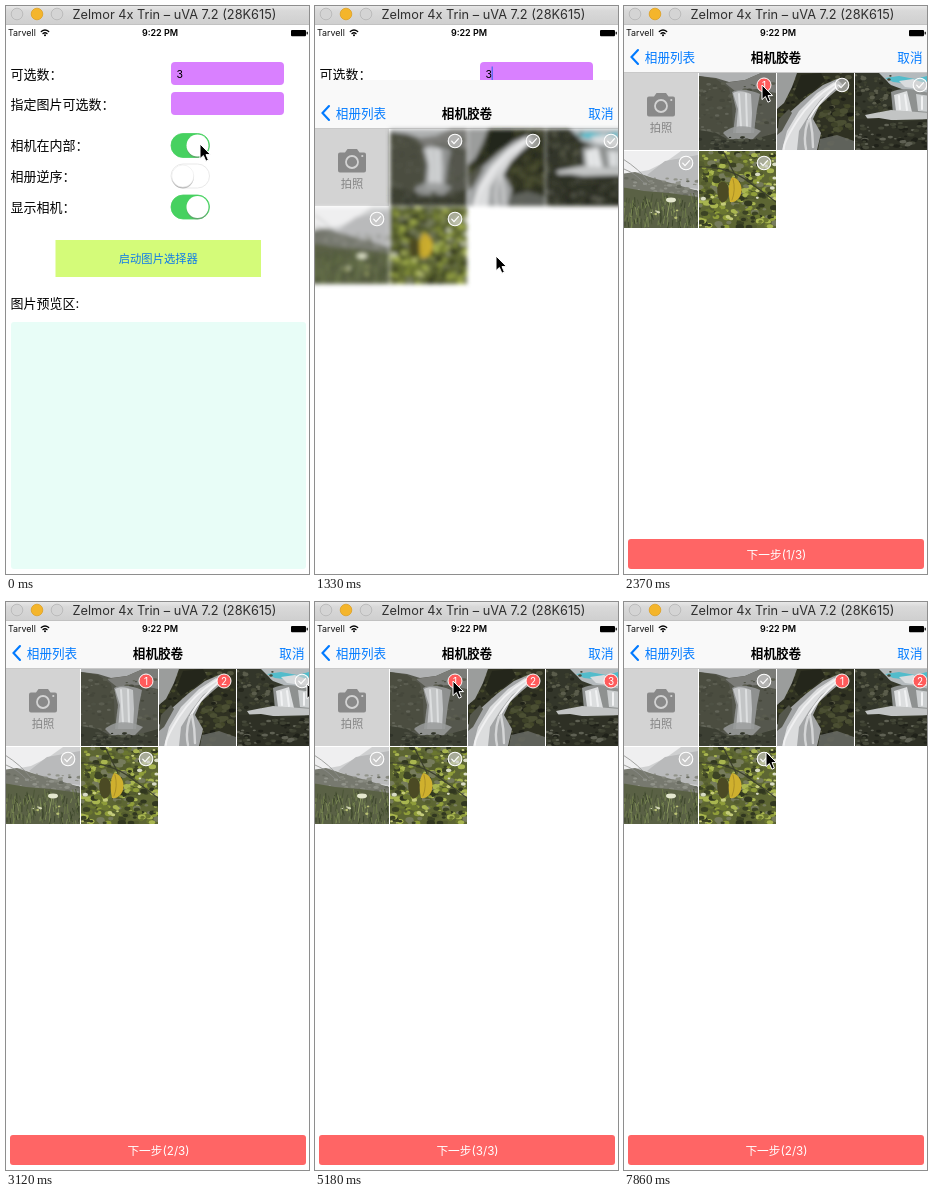
Recreate the animation shown at these times as an HTML page. Size 303 by 568 pixels, loop 8000 ms.

```html
<!DOCTYPE html>
<html lang="zh-CN">
<head>
<meta charset="utf-8">
<style>
html, body { margin: 0; width: 100%; height: 100%; overflow: hidden; background: #fff; }
svg { display: block; }
text { font-family: Inter, 'Noto Sans CJK SC', 'Noto Sans CJK', sans-serif; white-space: pre; }
</style>
</head>
<body>
<svg id="stage" width="303" height="568" viewBox="0 0 303 568"></svg>
<script>
const LOOP = 8000, TICK = 148.2, BLUE = '#007aff';
const stage = document.getElementById('stage');
const get = id => document.getElementById(id);

// Text placed by its vertical centre.
const text = (x, cy, size, str, fill = '#000', extra = '') =>
  `<text x="${x}" y="${cy + size * 0.37}" font-size="${size}" fill="${fill}" ${extra}>${str}</text>`;
const mid = 'text-anchor="middle"';
const rect = (x, y, w, h, fill, extra = '') =>
  `<rect x="${x}" y="${y}" width="${w}" height="${h}" fill="${fill}" ${extra}/>`;
const path = (d, fill, extra = '') => `<path d="${d}" fill="${fill}" ${extra}/>`;
const line = (d, stroke, width, extra = '') =>
  path(d, 'none', `stroke="${stroke}" stroke-width="${width}" stroke-linecap="round" ${extra}`);
const circle = (x, y, r, fill, extra = '') =>
  `<circle cx="${x}" cy="${y}" r="${r}" fill="${fill}" ${extra}/>`;

function random(seed) {
  return () => (seed = (seed * 16807) % 2147483647) / 2147483647;
}

// Scattered dabs of colour inside a box.
function dabs(seed, n, colors, x, y, w, h, rx, ry) {
  const rnd = random(seed * 7919);
  let out = '';
  for (let i = 0; i < n; i++) {
    const k = 0.5 + rnd();
    out += `<ellipse cx="${(x + rnd() * w).toFixed(1)}" cy="${(y + rnd() * h).toFixed(1)}" rx="${(rx * k).toFixed(1)}" ry="${(ry * k).toFixed(1)}" fill="${colors[Math.floor(rnd() * colors.length)]}"/>`;
  }
  return out;
}

function grass(seed, n) {
  const rnd = random(seed * 7919), colors = ['#6c7a4a', '#4a5436', '#7d8c56', '#3c452b'];
  let out = '';
  for (let i = 0; i < n; i++) {
    const x = rnd() * 78, y = 50 + rnd() * 30, tall = 3 + rnd() * 7;
    out += line(`M${x.toFixed(1)} ${y.toFixed(1)}l${(rnd() * 4 - 2).toFixed(1)} ${(-tall).toFixed(1)}`, colors[i % 4], 0.9);
  }
  return out;
}

const photos = [
  // wide fall between hills
  () => rect(0, 0, 77, 77, '#55574d') +
    path('M0 0H62L46 7L30 9L17 5L0 3Z', '#b0b2b3') +
    path('M46 7L62 0H77V20L58 16L36 18L26 10Z', '#7b7c78') +
    path('M0 3L17 6L30 15L33 30L34 60L0 66Z', '#4b4d40') +
    dabs(11, 110, ['#5a5c4f', '#45473b', '#626458', '#4e5144'], 0, 10, 77, 52, 2, 1.1) +
    path('M33 19C40 15 52 17 61 21L58 36L55 60L34 60L37 36Z', '#8f9190') +
    path('M34 20C39 17 46 18 52 21L53 40L52 60L37 60L39 36Z', '#c3c5c6') +
    line('M40 21L42 54M47 21L48 54', '#dddfe0', 2) +
    path('M24 60C34 51 50 52 62 58L54 66H30Z', '#9a9d9d', 'opacity=".85"') +
    path('M0 57L17 60L30 67L52 67L77 60V77H0Z', '#3c3f33') +
    dabs(12, 50, ['#4a4d40', '#2f3229', '#565a4b'], 0, 64, 77, 13, 2, 1),
  // stream running over rocks
  () => rect(0, 0, 77, 77, '#2f3122') +
    dabs(23, 120, ['#1f2118', '#44482a', '#3a3d28', '#54563f'], 0, 0, 77, 77, 2.4, 1.6) +
    path('M0 0H20L15 14L7 30L0 36Z', '#9b9d9c') +
    path('M60 6L66 12L54 22L42 33L36 46L44 60L40 77H0V56L12 40L30 24L46 12Z', '#a3a5a6') +
    path('M57 9L62 12L44 26L32 42L22 58L20 77H5L10 58L22 38L40 20Z', '#dcddde') +
    line('M58 11Q34 26 20 48T7 76M60 13Q42 28 32 46', '#f0f0f1', 2) +
    line('M31 48Q26 62 29 76M33 46Q36 60 36 74', '#d5d6d7', 2.4) +
    path('M2 46L12 36L15 40L5 58L0 62Z', '#55574c') +
    path('M24 2L44 0L48 8L36 18L22 27L17 20Z', '#24261b') +
    dabs(24, 26, ['#3f4329', '#1a1b14', '#4b4f33'], 44, 26, 30, 34, 3, 2) +
    path('M43 66L60 62L77 68V77H41Z', '#6c6e69', 'opacity=".8"'),
  // distant fall under a blue sky
  () => rect(0, 0, 77, 77, '#35382b') +
    path('M22 0H77V22L52 18L36 12Z', '#b4babd') +
    path('M30 5L44 3L60 6L72 3V9L56 11L38 9Z', '#52bccb') +
    path('M44 8L58 6L72 11V17L50 14Z', '#d9dcde') +
    path('M0 0H24L32 8L38 18L41 39L0 46Z', '#33362a') +
    dabs(31, 70, ['#454836', '#25271d', '#3d402f', '#5b5d4c'], 0, 2, 36, 42, 2, 1.4) +
    path('M36 19C48 13 64 17 77 21V41L38 40Z', '#8e9190') +
    path('M39 22L52 18L57 39L41 38Z', '#dcdedf') +
    path('M61 21L77 23V39L63 38Z', '#cccfd0') +
    line('M44 23L45 36M50 22L52 37M67 24V36', '#f1f2f3', 2) +
    path('M10 42L36 37L77 40V46L40 47L14 48Z', '#c2c4c4') +
    path('M0 46L24 45L48 49L77 46V77H0Z', '#2e3025') +
    dabs(32, 90, ['#46493a', '#20221a', '#3d4031', '#5f6154'], 0, 50, 77, 27, 2.4, 1.2),
  // grass slope
  () => rect(0, 0, 77, 77, '#cfd0d1') +
    path('M0 0H60L46 10L28 19L0 24Z', '#efeff0') +
    path('M44 10L77 4V38L46 34L26 24Z', '#b9babb') +
    path('M0 23L14 21L32 27L50 32L77 40V77H0Z', '#77796f') +
    dabs(41, 70, ['#85877d', '#686b60', '#91938a'], 0, 27, 77, 20, 2, 1.1) +
    line('M2 8Q18 18 28 31M3 18Q16 23 25 34', '#8c8d8b', 0.8) +
    path('M0 36L23 40L48 42L77 46V77H0Z', '#5a6145') +
    grass(42, 150) +
    line('M49 50L46 66', '#8c9a60', 1) +
    `<ellipse cx="50" cy="49" rx="5" ry="2.4" fill="#e4e7cf"/>` +
    dabs(43, 8, ['#b9c074', '#d5d8b8'], 22, 53, 40, 14, 1.1, 0.8),
  // leaves
  () => rect(0, 0, 77, 77, '#5d6633') +
    dabs(51, 330, ['#8f9d3a', '#3c4324', '#a9b650', '#6a7630', '#31371f', '#767b5c', '#545c2f'], 0, 0, 77, 77, 2.8, 1.9) +
    dabs(52, 26, ['#d9dcc4', '#c5cc7a'], 0, 0, 77, 77, 1.8, 1.3) +
    line('M0 16Q28 15 50 31T77 51M24 0L37 26', '#3b3f2c', 1.2) +
    path('M20 32C26 28 31 34 30 42C29 49 25 53 22 51C18 46 17 38 20 32Z', '#4b4a24') +
    path('M33 26C40 27 44 35 42 43C40 49 35 52 31 51C29 42 29 32 33 26Z', '#cfb02e') +
    line('M34 28Q37 39 33 49', '#a98c25', 0.9)
];

const cells = [[1, 0], [2, 0], [3, 0], [0, 1], [1, 1]];
const cellX = c => -3 + 78 * c, cellY = r => 67 + 78 * r;

const photo = (draw, i) => {
  const [c, r] = cells[i];
  return `<svg x="${cellX(c)}" y="${cellY(r)}" width="77" height="77">${draw()}</svg>`;
};

const badge = ([c, r], i) => `<g transform="translate(${cellX(c) + 65} ${cellY(r) + 12})">
  <g id="off${i}">${circle(0, 0, 6.8, '#d0d0d0', 'fill-opacity=".65" stroke="#fff" stroke-width="1.1"')}
    ${line('M-3.3 .2L-1 2.6L3.5 -2.3', '#fff', 1.2)}</g>
  <g id="on${i}">${circle(0, 0, 7, '#ff5b5b', 'stroke="#fff" stroke-width="1"')}
    <text id="num${i}" y="3.7" font-size="10" fill="#fff" ${mid}></text></g></g>`;

function toggle(cy, on) {
  const x = on ? 191.5 : 176.8;
  return rect(165, cy - 12, 38.5, 24, on ? '#47d160' : '#fff',
      `rx="12" stroke="${on ? '#47d160' : '#e4e4e4'}" stroke-width=".8"`) +
    circle(x, cy + 1.6, 10.9, '#777', 'opacity=".45"') +
    circle(x, cy, 11, '#fff', on ? '' : 'stroke="#e6e6e6" stroke-width=".5"');
}

const labels = [['可选数：', 68], ['指定图片可选数：', 98], ['相机在内部：', 139],
  ['相册逆序：', 170], ['显示相机：', 201], ['图片预览区:', 297.5]];

const form = labels.map(([s, y]) => text(4.5, y, 13, s)).join('') +
  rect(165, 56, 113, 23, '#d980ff', 'rx="4"') +
  rect(165, 86, 113, 23, '#d980ff', 'rx="4"') +
  text(170.5, 67.8, 10.5, '3') +
  rect(176.6, 60.5, 1.2, 14, '#4868ee', 'id="caret"') +
  toggle(139.5, true) + toggle(170, false) + toggle(201, true) +
  rect(49.5, 234, 205.5, 37, '#d4fb79') +
  text(152.3, 252.5, 11.3, '启动图片选择器', '#0f7bea', `id="launch" ${mid}`) +
  rect(5, 316, 295, 247, '#e8fdf7', 'rx="3"');

const camera = rect(0, 67, 74, 77, '#d3d3d3') +
  path('M25 90.5H30L32.5 87H42L44.5 90.5H49Q51 90.5 51 92.5V108.5Q51 110.5 49 110.5H25Q23 110.5 23 108.5V92.5Q23 90.5 25 90.5Z', '#898989') +
  circle(37, 100, 6, 'none', 'stroke="#d3d3d3" stroke-width="1.8"') +
  circle(47.3, 94, 1.1, '#d3d3d3') +
  text(37, 122, 11.3, '拍照', '#858585', mid);

const picker = rect(0, 18, 303, 551, '#fff') +
  rect(0, 18, 303, 48.5, '#f9f9f9') + rect(0, 66, 303, 1, '#c9c9c9') +
  line('M14 44L7.5 51L14 58', BLUE, 2.1) +
  text(20.8, 51, 12.6, '相册列表', BLUE) +
  text(152, 51, 12.6, '相机胶卷', '#000', `${mid} font-weight="700"`) +
  text(298.5, 51, 12.6, '取消', BLUE, 'text-anchor="end"') +
  camera + `<g id="photos">${photos.map(photo).join('')}</g>` + cells.map(badge).join('') +
  rect(4, 533, 296, 30, '#ff9898', 'id="next" rx="3"') +
  text(152.5, 548.5, 11.7, '', '#fff', `id="count" ${mid}`);

const statusBar = text(2, 27, 8.9, 'Tarvell', '#111') +
  line('M35.3 25.6Q39 22.3 42.7 25.6M37 27.6Q39 25.9 41 27.6', '#000', 1.3) +
  circle(39, 29.3, 1, '#000') +
  text(154, 27, 9, '9:22 PM', '#000', `${mid} font-weight="600"`) +
  rect(285, 24, 15, 6.3, '#000', 'rx="1"') + rect(300.6, 25.8, 1.2, 2.6, '#000');

const titleBar = rect(0, 0, 303, 18.5, 'url(#bar)') + rect(0, 18, 303, 0.7, '#b4b4b4') +
  [11, 31, 51].map((x, i) => circle(x, 8, 5.8, i === 1 ? '#f4b52b' : '#d4d4d4',
    `stroke="${i === 1 ? '#dda024' : '#b5b5b5'}" stroke-width=".8"`)).join('') +
  text(168.5, 8.3, 12.75, 'Zelmor 4x Trin – uVA 7.2 (28K615)', '#2f2f2f', mid);

stage.innerHTML = `<defs>
  <linearGradient id="bar" x2="0" y2="1"><stop stop-color="#e8e8e8"/><stop offset=".25" stop-color="#d9d9d9"/><stop offset="1" stop-color="#cfcfcf"/></linearGradient>
  <filter id="soft"><feGaussianBlur stdDeviation="2"/></filter></defs>` +
  rect(0, 0, 303, 568, '#fff') + form + `<g id="picker">${picker}</g>` + statusBar + titleBar +
  path('M0 0V14.6L3.4 11.5L5.9 17.2L8.4 16.1L6 10.6H10.5Z', '#000',
    'id="cursor" stroke="#fff" stroke-width="1" stroke-linejoin="round"');

// Pointer stops: tick, x, y.
const stops = [[0, 194, 138], [5, 181, 250], [11, 181, 250], [14, 138, 79], [16, 138, 79],
  [19, 217, 79], [20, 217, 79], [21, 301, 82], [23, 294, 79], [24, 294, 79],
  [30, 148, 75], [32, 143, 81], [35, 138, 79], [50, 138, 79], [53, 142, 150]];

function pointer(n) {
  const i = stops.findIndex(s => s[0] > n);
  if (i < 0) return stops[stops.length - 1].slice(1);
  const [a, b] = [stops[i - 1], stops[i]];
  const p = (n - a[0]) / (b[0] - a[0]), e = p * p * (3 - 2 * p);
  return [1, 2].map(k => a[k] + (b[k] - a[k]) * e);
}

// Photos picked so far, in order.
function picked(n) {
  if (n < 16) return [];
  if (n < 21) return [0];
  if (n < 25) return [0, 1];
  return n < 45 ? [0, 1, 2] : [1, 2];
}

const show = (id, on) => get(id).setAttribute('visibility', on ? 'visible' : 'hidden');

function render(t) {
  const n = Math.floor((t + 12) / TICK);
  const [x, y] = pointer(n);
  get('cursor').setAttribute('transform', `translate(${x.toFixed(1)} ${y.toFixed(1)})`);
  show('caret', n >= 4);
  get('launch').setAttribute('opacity', n >= 6 ? 0.35 : 1);

  const s = 0.97 + 2.9 * (n - 8);
  const drop = n < 8 ? 568 : Math.round(549 * (1 + s) * Math.exp(-s));
  get('picker').setAttribute('transform', `translate(0 ${drop})`);
  get('photos').setAttribute('filter', n < 10 ? 'url(#soft)' : 'none');

  const list = picked(n);
  cells.forEach((_, i) => {
    const k = list.indexOf(i);
    show('off' + i, k < 0);
    show('on' + i, k >= 0);
    get('num' + i).textContent = k + 1;
  });
  get('next').setAttribute('fill', list.length ? '#ff6565' : '#ff9898');
  get('count').textContent = `下一步(${list.length}/3)`;
}

const start = performance.now();
function frame() {
  render((performance.now() - start) % LOOP);
  requestAnimationFrame(frame);
}
frame();
</script>
</body>
</html>
```
